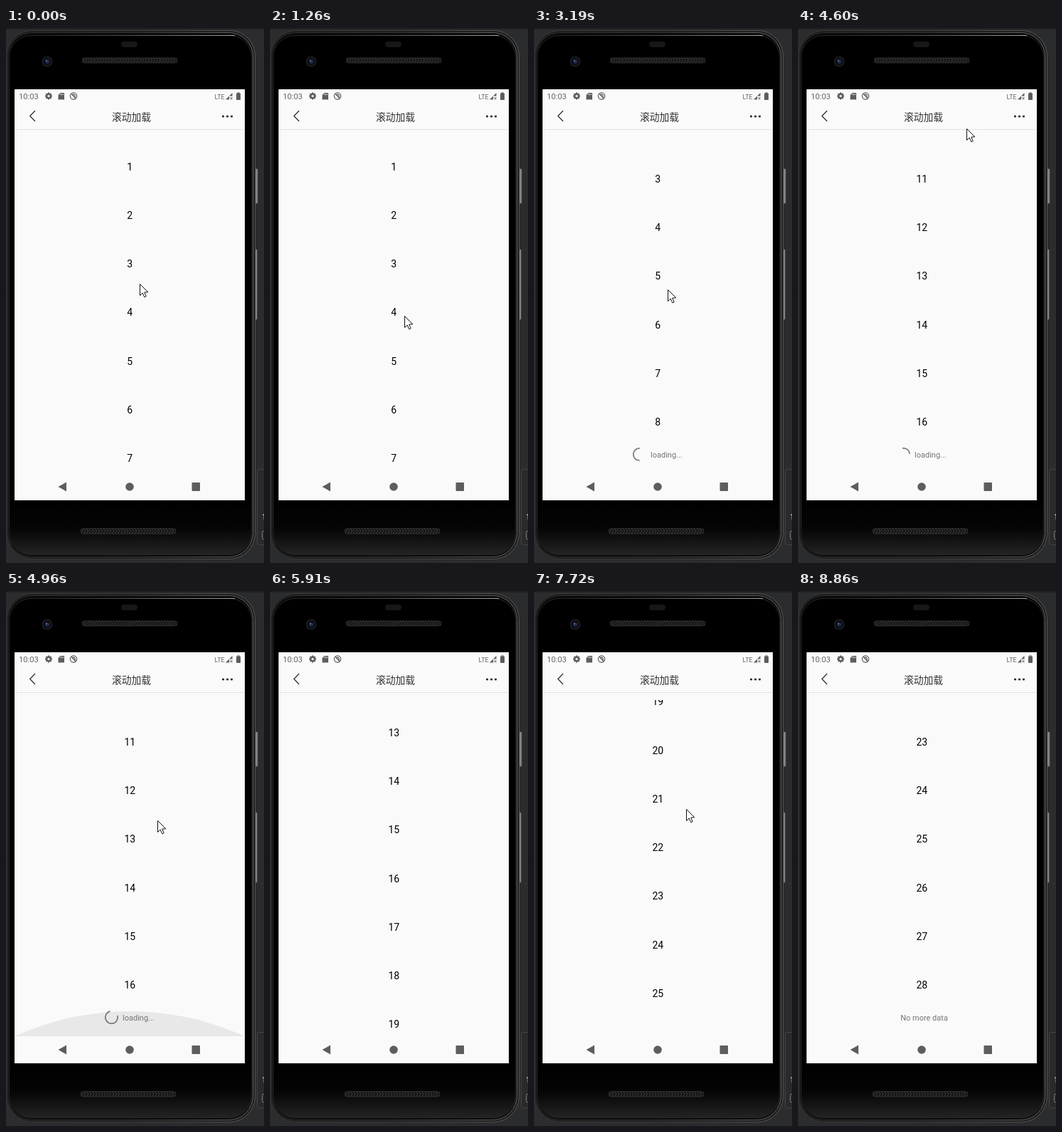
An HTML page with a canvas for the animation above (8950 ms loop, 363 px wide and 751 px high).

```html
<!DOCTYPE html>
<html lang="zh">
<head>
<meta charset="utf-8">
<title>滚动加载</title>
<style>
  html, body { margin: 0; width: 100%; height: 100%; overflow: hidden; background: #2b2c2e; }
  canvas { display: block; width: 363px; height: 751px; }
</style>
</head>
<body>
<canvas id="stage" width="363" height="751"></canvas>
<script>
const ctx = document.getElementById('stage').getContext('2d');
const LOOP = 8950, TAU = Math.PI * 2, RAD = Math.PI / 180;
const ROBOTO = 'Roboto, "Noto Sans", sans-serif';
const CJK = '"Noto Sans CJK SC", "Noto Sans CJK", sans-serif';
const ROW = 68.25, FIRST_ROW = 194.5, LAST_ROW = 553, PAGE = 8, TOTAL = 28;
const PAPER = '#fafafa', ICON = '#5d5d5d', MUTED = '#757575';

const rowsAfter = pages => Math.min(TOTAL, PAGE * pages);
// Scroll position that rests on the end of a list of n rows
const endOf = n => n ? FIRST_ROW + ROW * (n - 1) - LAST_ROW : 0;

// Each page is flung to its end, glows at the edge and loads the next one
const pages = [
  { fling: [2010, 2260], glow: 2570, load: [2798, 3310], angle: 0 },
  { fling: [3370, 4300], glow: 4700, load: [4351, 5600], angle: -157 },
  { fling: [5783, 6650], glow: 6720, load: [6093, 7600], angle: -203 },
  { fling: [7650, 8300] }
];

// Pointer strokes: start, end, x, y
const strokes = [
  [120, 660, 188, 431], [1090, 1960, 197, 162],
  [2450, 2630, 203, 86], [2700, 3190, 188, 367],
  [3370, 3600, 260, 6], [3750, 4250, 237, 141], [4600, 5200, 200, 420],
  [5780, 5900, 375, 20], [6800, 7500, 200, 420],
  [7660, 7800, 235, 137], [7850, 8680, 310, 752]
];

const clamp = v => Math.max(0, Math.min(1, v));
const span = (t, a, b) => clamp((t - a) / (b - a));
const smooth = v => v * v * (3 - 2 * v);
const easeOut = v => v * (2 - v);
const mix = (a, b, k) => a + (b - a) * k;

function box(x, y, w, h, r, fill, stroke) {
  ctx.beginPath();
  ctx.roundRect(x, y, w, h, r);
  if (fill) { ctx.fillStyle = fill; ctx.fill(); }
  if (stroke) { ctx.strokeStyle = stroke; ctx.lineWidth = 1; ctx.stroke(); }
}

function disc(x, y, r, fill) {
  ctx.beginPath();
  ctx.arc(x, y, r, 0, TAU);
  ctx.fillStyle = fill;
  ctx.fill();
}

function arc(x, y, r, from, to, color, width) {
  ctx.beginPath();
  ctx.arc(x, y, r, from, to);
  ctx.strokeStyle = color;
  ctx.lineWidth = width;
  ctx.stroke();
}

function path(points, fill, stroke, width = 1) {
  ctx.beginPath();
  points.forEach(([x, y]) => ctx.lineTo(x, y));
  if (fill) { ctx.closePath(); ctx.fillStyle = fill; ctx.fill(); }
  if (stroke) { ctx.strokeStyle = stroke; ctx.lineWidth = width; ctx.stroke(); }
}

function text(value, x, y, size, color, align = 'left', family = ROBOTO) {
  ctx.font = `${size}px ${family}`;
  ctx.textAlign = align;
  ctx.fillStyle = color;
  ctx.fillText(value, x, Math.round(y));
}

function blend(x0, y0, x1, y1, ...colors) {
  const g = ctx.createLinearGradient(x0, y0, x1, y1);
  colors.forEach((c, i) => g.addColorStop(i / (colors.length - 1), c));
  return g;
}

function clipTo(x, y, w, h, r = 0) {
  ctx.save();
  ctx.beginPath();
  ctx.roundRect(x, y, w, h, r);
  ctx.clip();
}

function grille(x, y, w, h) {
  box(x, y, w, h, h / 2, '#141414', '#2a2a2a');
  clipTo(x, y, w, h, h / 2);
  for (let i = 0; i < w; i += 4) {
    path([[x + i, y + h], [x + i + 3, y + h / 2], [x + i, y]], null, '#444');
  }
  ctx.restore();
}

function drawPhone() {
  ctx.fillStyle = '#2b2c2e';
  ctx.fillRect(0, 0, 363, 751);
  ctx.fillStyle = '#202123';
  ctx.fillRect(0, 0, 363, 2);

  box(353.5, 619.5, 20, 106, 3, '#292a2b', '#444');
  text('1', 360, 690, 10, '#ddd');
  box(360.5, 706.5, 8, 11, 1, null, '#777');

  // Metal rim, then the glass with its sheen at the foot
  box(0.5, 3.5, 350, 742, 36, '#1f1f1f', blend(0, 0, 350, 0, '#3a3a3a', '#3a3a3a', '#555'));
  box(2.5, 6.5, 345, 736, 34, '#0a0a0a', blend(0, 0, 346, 0, '#2d2d2d', '#333', '#666'));
  box(4.5, 10.5, 341, 729, 31, blend(0, 664, 0, 740, '#000', '#050505', '#242424'), '#262626');
  path([[40, 10.5], [322, 10.5]], null, blend(40, 0, 322, 0, '#222', '#555', '#a0a0a0'));

  const metal = blend(350, 0, 355, 0, '#555', '#8b8d89', '#5b5c5a');
  box(350.5, 197.5, 4, 49, 1.5, metal, '#444');
  box(350.5, 310.5, 3, 99, 1.5, metal, '#444');

  box(162, 19, 23, 8, 4, '#171717');
  disc(58, 47, 7.5, '#1b1c1e');
  disc(58, 47, 5.5, '#0b0d14');
  disc(58, 47, 3, '#1f2a4a');
  disc(57, 46, 1, '#6674a0');
  grille(107, 42, 134, 7);
  grille(105, 702.5, 134, 7.5);

  ctx.fillStyle = PAPER;
  ctx.fillRect(12, 86, 324, 577);
}

function drawStatusBar() {
  text('10:03', 18, 100, 11.2, '#666');

  for (let a = 0; a < TAU; a += TAU / 8) {
    path([[60, 95.5], [60 + 5 * Math.cos(a), 95.5 + 5 * Math.sin(a)]], null, ICON, 2.2);
  }
  disc(60, 95.5, 3.8, ICON);
  disc(60, 95.5, 1.6, PAPER);

  path([[76.5, 91], [82, 91], [82, 100.5], [73.5, 100.5], [73.5, 94]], ICON);
  ctx.fillStyle = PAPER;
  for (let x = 76.3; x < 80; x += 1.8) ctx.fillRect(x, 92.2, 0.8, 2);

  arc(95, 95.5, 4.7, 0, TAU, ICON, 1.2);
  arc(95, 95.5, 2.3, -2.5, 1.2, ICON, 1.2);
  path([[92, 92.5], [98.5, 99]], null, ICON, 1.4);

  text('LTE', 293.5, 99.5, 9, '#666');
  path([[309, 100.5], [318.5, 91], [318.5, 95.5], [314, 95.5], [314, 100.5]], ICON);
  path([[315.3, 97], [318.6, 100.4]], null, ICON);
  path([[318.6, 97], [315.3, 100.4]], null, ICON);
  box(324, 91.5, 6, 9.5, 0.8, ICON);
  ctx.fillRect(325.5, 90.4, 3, 1.5);
}

function drawBars() {
  path([[41, 116], [33.7, 123.5], [41, 131]], null, '#333', 1.3);
  text('滚动加载', 176.5, 130, 13.8, '#333', 'center', CJK);
  for (let i = -1; i <= 1; i++) disc(311.5 + 6 * i, 124, 1.6, '#222');
  ctx.fillStyle = '#e2e2e2';
  ctx.fillRect(12, 142, 324, 1);

  path([[73.5, 644], [85, 637.5], [85, 650.5]], ICON);
  disc(174, 644, 5.8, ICON);
  box(261.5, 638, 11.5, 12, 0.8, ICON);
}

function drawSpinner({ load, angle }, t, y) {
  const ms = t - load[0];
  const turn = (ms / 1333) % 1;
  const head = 270 * smooth(clamp(2 * turn));
  const tail = 270 * smooth(clamp(2 * turn - 1));
  const start = angle + 90 * turn + tail + 0.162 * ms;
  arc(148.5, y, 8.7, start * RAD, (start + head - tail + 10) * RAD, MUTED, 1.7);
}

function drawGlow(peak, t) {
  // Stays full briefly after the peak, then sinks away
  const k = span(t, peak - 100, peak) * (1 - smooth(span(t, peak + 50, peak + 600)));
  ctx.globalAlpha = k;
  disc(174, 965 + 52 * (1 - k), 392, '#e0e0e0');
  ctx.globalAlpha = 1;
}

function drawList(t) {
  let scroll = 0, rows = PAGE, loading = null;
  pages.forEach((page, i) => {
    const { fling, load } = page;
    if (t >= fling[0]) {
      scroll = mix(endOf(rowsAfter(i)), endOf(rowsAfter(i + 1)), easeOut(span(t, ...fling)));
    }
    if (load && t >= load[1]) rows = rowsAfter(i + 2);
    else if (load && t >= load[0]) loading = page;
  });

  clipTo(12, 153, 324, 472);
  pages.forEach(({ glow }) => glow && drawGlow(glow, t));
  for (let n = 1; n <= rows; n++) {
    text(n, 174.3, FIRST_ROW + ROW * (n - 1) - scroll + 5, 14, '#000', 'center');
  }
  const footer = FIRST_ROW + ROW * (rows - 1) - scroll + 45.5;
  if (loading) {
    drawSpinner(loading, t, footer);
    text('loading...', 164, footer + 4, 11, MUTED);
  } else {
    const label = rows === TOTAL ? 'No more data' : 'Pull up to show more';
    text(label, 177.5, footer + 4, 11, MUTED, 'center');
  }
  ctx.restore();
}

function drawPointer(t) {
  let x = 188, y = 359;
  for (const [start, end, toX, toY] of strokes) {
    const k = smooth(span(t, start, end));
    x = mix(x, toX, k);
    y = mix(y, toY, k);
  }
  ctx.save();
  ctx.translate(Math.round(x) + 0.5, Math.round(y) + 0.5);
  path([[0, 0], [0, 16], [3.7, 12.5], [6.3, 18.3], [8.7, 17.2], [6.2, 11.6], [11.3, 11.3]], '#fff');
  ctx.strokeStyle = '#111';
  ctx.stroke();
  ctx.restore();
}

function render(t) {
  ctx.lineWidth = 1;
  drawPhone();
  drawStatusBar();
  drawList(t);
  drawBars();
  ctx.lineWidth = 1;
  drawPointer(t);
}

const began = performance.now();
function tick() {
  render((performance.now() - began) % LOOP);
  requestAnimationFrame(tick);
}
tick();
</script>
</body>
</html>
```
